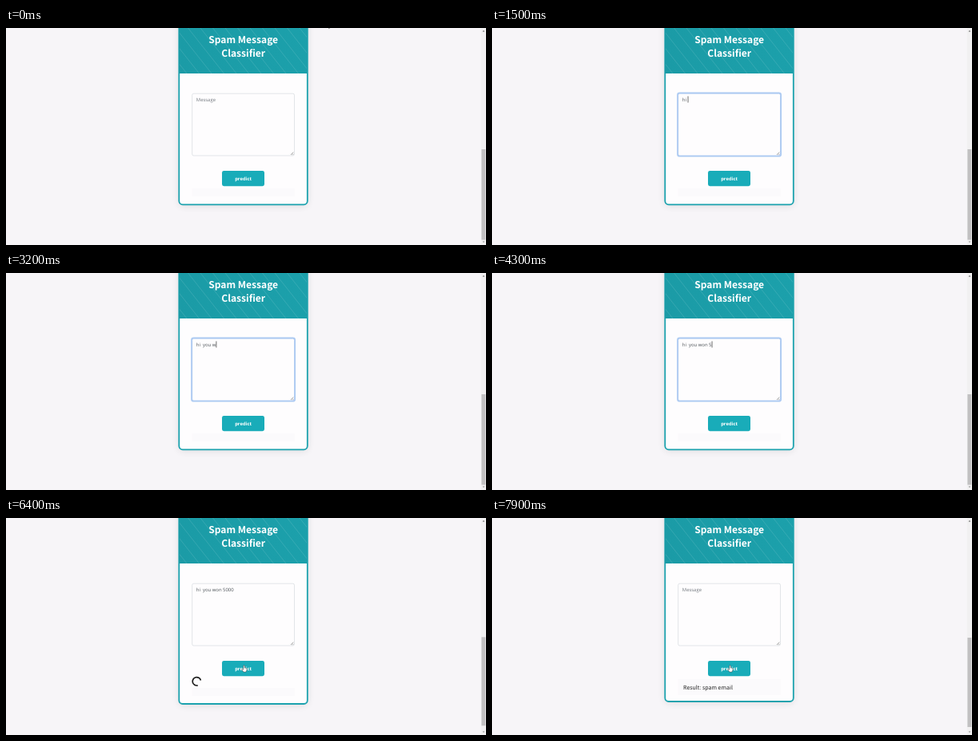
Write an HTML page that moves like this. It is 600 by 272 pixels and loops after 8 s.

```html
<!DOCTYPE html>
<html lang="en">
<head>
<meta charset="utf-8">
<title>Spam Message Classifier</title>
<style>
  html, body { margin: 0; width: 100%; height: 100%; overflow: hidden; background: #f7f5f8; }
  svg { display: block; width: 600px; height: 272px; }
  text { text-rendering: geometricPrecision; white-space: pre; }
  .head { font: 700 12.05px "Noto Sans CJK JP", "Noto Sans CJK SC", "Open Sans", sans-serif; fill: #fff; text-anchor: middle; }
  .result { font: 400 7.02px "Noto Sans CJK JP", "Noto Sans CJK SC", "Open Sans", sans-serif; fill: #222; }
  .field { font: 400 5.93px "Open Sans", "Noto Sans", sans-serif; }
  .button { font: 700 5.9px "Open Sans", "Noto Sans", sans-serif; fill: #fff; text-anchor: middle; }
  #shadow { filter: blur(5px); }
</style>
</head>
<body>
<svg viewBox="0 0 600 272">
  <defs>
    <clipPath id="headClip"><rect x="217" y="0" width="159" height="57"/></clipPath>
    <linearGradient id="teal" x1="0" y1="0" x2="1" y2="0">
      <stop offset="0" stop-color="#1b9ba6"/>
      <stop offset="1" stop-color="#1ca0ab"/>
    </linearGradient>
  </defs>
  <rect width="600" height="272" fill="#f7f5f8"/>

  <rect id="shadow" x="216" y="-20" width="161" rx="5" fill="#000" opacity=".1"/>
  <rect id="card" x="216.3" y="-20" width="160.5" rx="4.5" fill="#fefdfe" stroke="#1ba2ae" stroke-width="1.8"/>
  <rect x="216" y="-5" width="161" height="62" fill="url(#teal)"/>
  <g id="stripes" clip-path="url(#headClip)" stroke="#fff" stroke-opacity=".2" stroke-width=".6"/>
  <text class="head" x="296.7" y="19.3">Spam Message</text>
  <text class="head" x="296.7" y="35.8">Classifier</text>

  <rect id="ring" x="232.1" y="81.6" width="129" height="79" rx="2.4" fill="none" stroke="#b0cdf3" stroke-width="2"/>
  <rect id="box" x="232.7" y="82.2" width="127.8" height="77.8" rx="2" fill="#fefdfe" stroke="#d6dade" stroke-width=".7"/>
  <path d="M356 159l3.3-3.3M358 159.2l1.4-1.4" stroke="#666" stroke-width=".6"/>
  <text id="hint" class="field" x="237.8" y="92" fill="#757a80">Message</text>
  <text id="typed" class="field" x="237.8" y="92" fill="#4d5358"></text>
  <rect id="caret" y="85.5" width=".7" height="8" fill="#333"/>

  <rect x="270" y="179" width="53" height="19.2" rx="2.4" fill="#19acb9"/>
  <text class="button" x="296.6" y="191">predict</text>

  <rect id="panel" x="232.5" width="128.5" fill="#fbfafc"/>
  <circle id="spinner" cx="238.4" cy="204.8" r="5.2" fill="none" stroke="#1c1c1c" stroke-width="1.7" pathLength="4" stroke-dasharray="3 1"/>
  <text id="result" class="result" x="239" y="215">Result: spam email</text>

  <rect x="593.8" width="6.2" height="272" fill="#f1f0f1"/>
  <path d="M595.6 4.6l1.4-1.6 1.4 1.6z" fill="#555"/>
  <path d="M595.6 267.4l1.4 1.6 1.4-1.6z" fill="#888"/>
  <rect id="thumb" x="594.4" width="5" fill="#c1c0c1"/>

  <g id="arrow" stroke="#333" stroke-width=".6" fill="#fff">
    <path d="M0 0v8l1.9-1.7 1.2 2.8 1.1-.5-1.2-2.7h2.6z"/>
  </g>
  <g id="beam" stroke="#333" stroke-width=".6" fill="none">
    <path d="M-1.5-4h3M0-4v8M-1.5 4h3"/>
  </g>
  <g id="hand" stroke="#333" stroke-width=".5" fill="#fff">
    <path d="M-1.2-4q.8-.7 1.5 0v2.8l2.3.5q.7.3.6 1.1l-.5 2.2-.8 1.4h-3l-2.2-3q0-.9.9-.7l1.2.8z"/>
  </g>
</svg>
<script>
const LOOP = 8000, STEP = 100, BLINK = 500;
const FOCUS = 300, PRESS = 6000, WAIT = 6100, DONE = 7600;
const message = "hi  you won 5000";
const keys = [1000, 1200, 1300, 2000, 2100, 2300, 2500, 2800, 3200, 3700, 3800, 4200, 4300, 4500, 4800, 5000];

// time, cursor, x, y
const mouse = [
  [0, "arrow", 400.5, -8.5], [100, "arrow", 362, 42], [200, "beam", 318, 92],
  [300, "beam", 297, 110], [1000, ""], [5800, "beam", 297, 148], [5900, "hand", 298, 189]
];

// time, card bottom, panel top, panel height, thumb top, thumb height
const layouts = [
  [0, 221.3, 201, 10, 152, 113.5],
  [WAIT, 233, 213, 10, 149.3, 111],
  [DONE, 230, 202, 20, 150, 112]
];

const $ = id => document.getElementById(id);
const set = (id, attrs) => {
  for (const name in attrs) $(id).setAttribute(name, attrs[name]);
};
const show = (id, on) => set(id, { visibility: on ? "visible" : "hidden" });
const latest = (table, t) => table.filter(row => row[0] <= t).pop();

for (let x = 150; x < 380; x += 15.5) {
  const line = document.createElementNS("http://www.w3.org/2000/svg", "path");
  line.setAttribute("d", `M${x} 0l45 57`);
  $("stripes").append(line);
}

function drawField(t) {
  const count = t < DONE ? keys.filter(k => k <= t).length : 0;
  const focused = t >= FOCUS && t < PRESS;
  const since = t - (count ? keys[count - 1] : FOCUS);
  const held = t === 3700 ? 0 : since;
  $("typed").textContent = message.slice(0, count);
  show("hint", !count);
  show("caret", focused && held % (2 * BLINK) < BLINK);
  set("caret", { x: 238 + (count ? $("typed").getComputedTextLength() : 0) });

  const fading = t === FOCUS || t === PRESS;
  set("ring", { opacity: fading ? .5 : focused ? 1 : 0 });
  set("box", { stroke: focused ? "#9fc1ee" : "#d6dade" });
}

function drawLayout(t) {
  const [, bottom, top, height, thumbTop, thumbHeight] = latest(layouts, t);
  set("card", { height: bottom + 20 });
  set("shadow", { height: bottom + 22 });
  set("panel", { y: top, height });
  set("thumb", { y: thumbTop, height: thumbHeight });

  // One turn lasts 750 ms; the gap follows three quarters of ink.
  const turn = 75 + (t - 6400) * 360 / 750;
  show("spinner", t >= WAIT && t < DONE);
  set("spinner", { transform: `rotate(${turn} 238.4 204.8)` });
  show("result", t >= DONE);
}

function drawMouse(t) {
  const [, kind, x, y] = latest(mouse, t);
  for (const id of ["arrow", "beam", "hand"]) {
    show(id, id === kind);
    if (id === kind) set(id, { transform: `translate(${x} ${y})` });
  }
}

let last = -1;
function frame() {
  const t = Math.floor(performance.now() % LOOP / STEP) * STEP;
  if (t !== last) {
    last = t;
    drawField(t);
    drawLayout(t);
    drawMouse(t);
  }
  requestAnimationFrame(frame);
}
frame();
</script>
</body>
</html>
```
